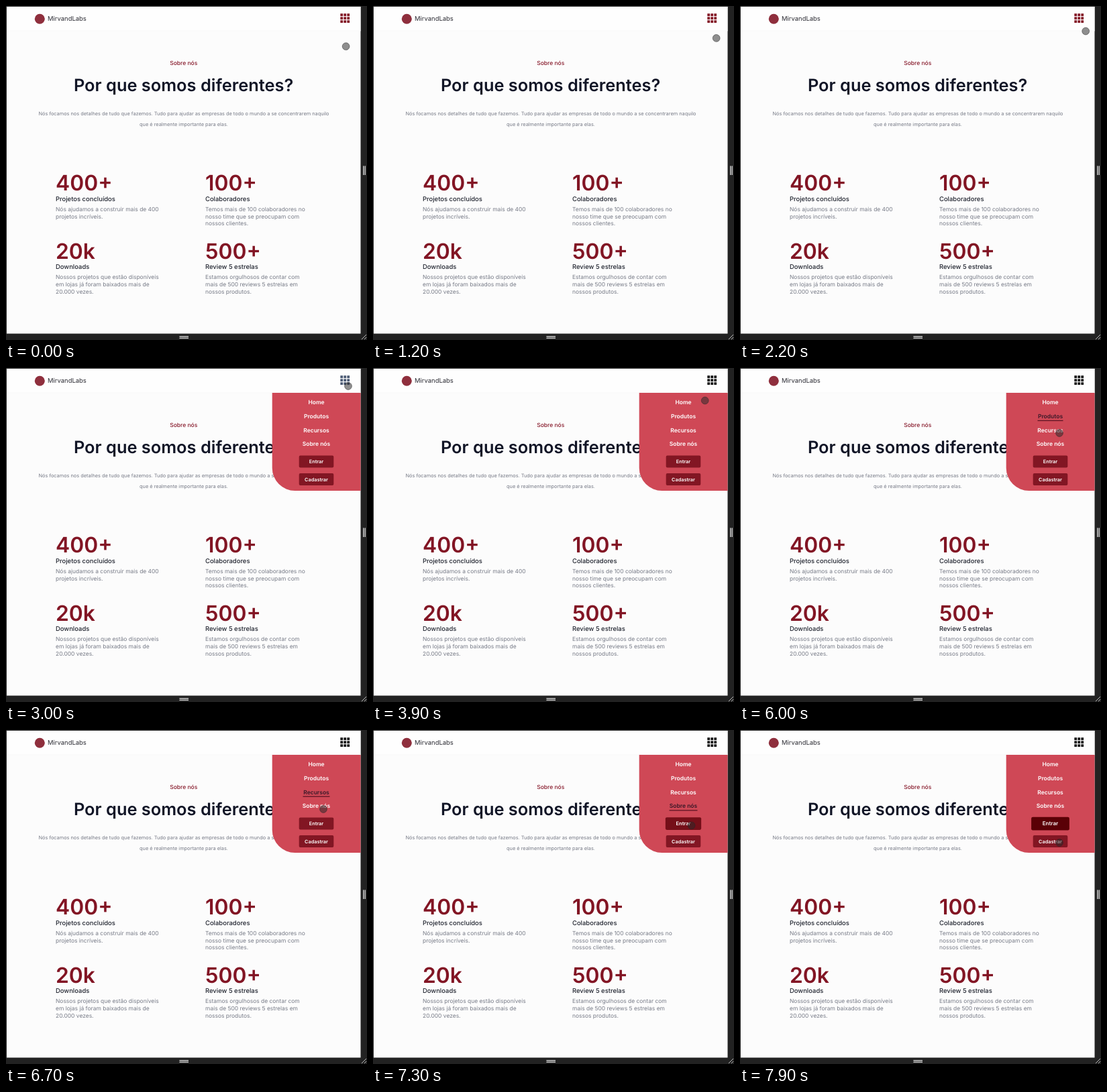
An HTML page for the animation above (8000 ms loop, 538 px wide and 498 px high).

```html
<!DOCTYPE html>
<html lang="pt">
<head>
<meta charset="utf-8">
<style>
  html, body { margin: 0; width: 100%; height: 100%; overflow: hidden; background: #222; }
  svg { display: block; }
  text { font-family: Inter, sans-serif; font-optical-sizing: none; text-rendering: geometricPrecision; }
  .mid { text-anchor: middle; }
  .brand { font-size: 9.45px; fill: #2b2b33; }
  .eyebrow { font-size: 8.5px; font-weight: 500; fill: #871a2b; }
  .heading { font-size: 25.4px; font-weight: 600; fill: #111526; }
  .lead { font-size: 7.37px; fill: #777b87; }
  .number { font-size: 31.8px; font-weight: 600; fill: #821524; }
  .title { font-size: 9.45px; font-weight: 500; fill: #20242f; }
  .body { font-size: 8.45px; fill: #777b87; }
  .link { font-size: 8.5px; font-weight: 600; fill: #fff; }
  .button { font-size: 7.3px; font-weight: 600; fill: #fff; }
</style>
</head>
<body>
<svg id="stage" width="538" height="498" viewBox="0 0 538 498"></svg>
<script>
const LOOP = 8000, STEP = 100, FADE = 150, MENU_OPEN = 2800, MENU_X = 462.5;
const stage = document.getElementById('stage');

function add(tag, attrs, parent = stage, content = '') {
  const el = document.createElementNS('http://www.w3.org/2000/svg', tag);
  for (const key in attrs) el.setAttribute(key, attrs[key]);
  el.textContent = content;
  return parent.appendChild(el);
}
const rect = (x, y, width, height, fill, parent, rx = 0) =>
  add('rect', { x, y, width, height, fill, rx }, parent);
const write = (x, y, style, content, parent) =>
  add('text', { x, y, class: style }, parent, content);

// Viewport and resize handles
rect(0, 0, 538, 498, '#222');
rect(1, 1, 527.5, 487.5, '#fcfcfc');
rect(1, 1, 527.5, 36, '#fefefe');
rect(1, 36.5, 527.5, 1, '#f9f9fa');
rect(258.5, 492, 13.5, 4, '#777');
rect(532, 238.5, 4, 13.5, '#777');
for (const offset of [0, 3]) {
  rect(258.5, 492 + offset, 13.5, 1, '#c4c4c4');
  rect(532 + offset, 238.5, 1, 13.5, '#c4c4c4');
}
add('path', { d: 'M530 497l7-7M534 497l3-3', stroke: '#bbb', fill: 'none' });

// Header
add('circle', { cx: 50.3, cy: 19.2, r: 7.5, fill: '#8f2f3d' });
write(62, 22.4, 'brand', 'MirvandLabs');
const icon = add('g', {});
for (let i = 0; i < 9; i++)
  add('rect', { x: 498.3 + i % 3 * 5, y: 11.3 + Math.floor(i / 3) * 5, width: 3.8, height: 3.8 }, icon);

// Page content
write(264.7, 87.5, 'eyebrow mid', 'Sobre nós');
write(264.6, 127.2, 'heading mid', 'Por que somos diferentes?');
write(265, 163.2, 'lead mid', 'Nós focamos nos detalhes de tudo que fazemos. Tudo para ajudar as empresas de todo o mundo a se concentrarem naquilo');
write(265, 179, 'lead mid', 'que é realmente importante para elas.');

const stats = [
  [74, 275, '400+', 'Projetos concluídos', 'Nós ajudamos a construir mais de 400', 'projetos incríveis.'],
  [297, 275, '100+', 'Colaboradores', 'Temos mais de 100 colaboradores no', 'nosso time que se preocupam com', 'nossos clientes.'],
  [74, 376.6, '20k', 'Downloads', 'Nossos projetos que estão disponíveis', 'em lojas já foram baixados mais de', '20.000 vezes.'],
  [297, 376.6, '500+', 'Review 5 estrelas', 'Estamos orgulhosos de contar com', 'mais de 500 reviews 5 estrelas em', 'nossos produtos.'],
];
for (const [x, y, number, title, ...lines] of stats) {
  write(x, y, 'number', number);
  write(x, y + 15.7, 'title', title);
  lines.forEach((line, i) => write(x, y + 30.8 + i * 10.7, 'body', line));
}

// Menu
const menu = add('g', {});
add('path', { d: 'M396.7 37H528.5V183H430.7A34 34 0 0 1 396.7 149Z', fill: '#cf4856' }, menu);

const links = [
  ['Home', 53.6, 26, 4200, 5150],
  ['Produtos', 74.9, 38, 5250, 6150],
  ['Recursos', 95.6, 40, 6250, 6900],
  ['Sobre nós', 116.3, 42, 6950, 7300],
].map(([name, y, width, start, end]) => ({
  label: write(MENU_X, y, 'link mid', name, menu),
  line: rect(MENU_X - width / 2, y + 2.9, width, 1.3, '#5f1424', menu),
  start, end,
}));

function button(name, y) {
  const group = add('g', {}, menu);
  const box = rect(-25.8, -9, 51.6, 18, '#821623', group, 2);
  write(0, 2.6, 'button mid', name, group);
  const scale = s => group.setAttribute('transform', `translate(${MENU_X} ${y}) scale(${s})`);
  scale(1);
  return { box, scale };
}
const enter = button('Entrar', 139.6);
button('Cadastrar', 166);

const cursor = add('circle', { r: 5.4, fill: '#282828', 'fill-opacity': .52, stroke: '#282828', 'stroke-opacity': .5 });

// time, x, y
const path = [
  [0, 506.6, 60.2], [1000, 511, 50], [2200, 515.2, 37.5], [2700, 510, 25], [3000, 510, 27],
  [3600, 509, 44], [4000, 490, 50], [4300, 473, 52], [4700, 472, 55], [5000, 474, 67],
  [5400, 475, 77], [5700, 476, 84], [6000, 476, 97], [6300, 475, 104], [6700, 473, 118],
  [6800, 473, 118], [7100, 474, 131], [7400, 475, 148], [7500, 475, 148], [7900, 476, 168],
];

const clamp = v => Math.min(1, Math.max(0, v));
const mix = (a, b, k) => `color-mix(in srgb, ${b} ${k * 100}%, ${a})`;
const hover = (t, start, end) => clamp((t - start) / FADE) * clamp((end + FADE - t) / FADE);

function pointAt(t) {
  const next = Math.max(1, path.findIndex(p => p[0] >= t));
  const [t0, x0, y0] = path[next - 1], [t1, x1, y1] = path[next];
  const k = (t - t0) / (t1 - t0);
  return [x0 + (x1 - x0) * k, y0 + (y1 - y0) * k];
}

function draw(t) {
  const [x, y] = pointAt(t);
  cursor.setAttribute('cx', x);
  cursor.setAttribute('cy', y);

  const open = t >= MENU_OPEN;
  menu.setAttribute('visibility', open ? 'visible' : 'hidden');
  icon.style.fill = open ? mix('#4b5a73', '#111', clamp((t - 3100) / 300)) : '#821524';

  for (const { label, line, start, end } of links) {
    const k = hover(t, start, end);
    label.style.fill = mix('#fff', '#3a1828', k);
    line.setAttribute('opacity', k);
  }
  const k = hover(t, 7250, LOOP);
  enter.box.style.fill = mix('#821623', '#5a0006', k);
  enter.scale(1 + .1 * k);
}

const origin = performance.now();
function tick() {
  const t = (performance.now() - origin) % LOOP;
  draw(Math.floor(t / STEP) * STEP);
  requestAnimationFrame(tick);
}
tick();
</script>
</body>
</html>
```
